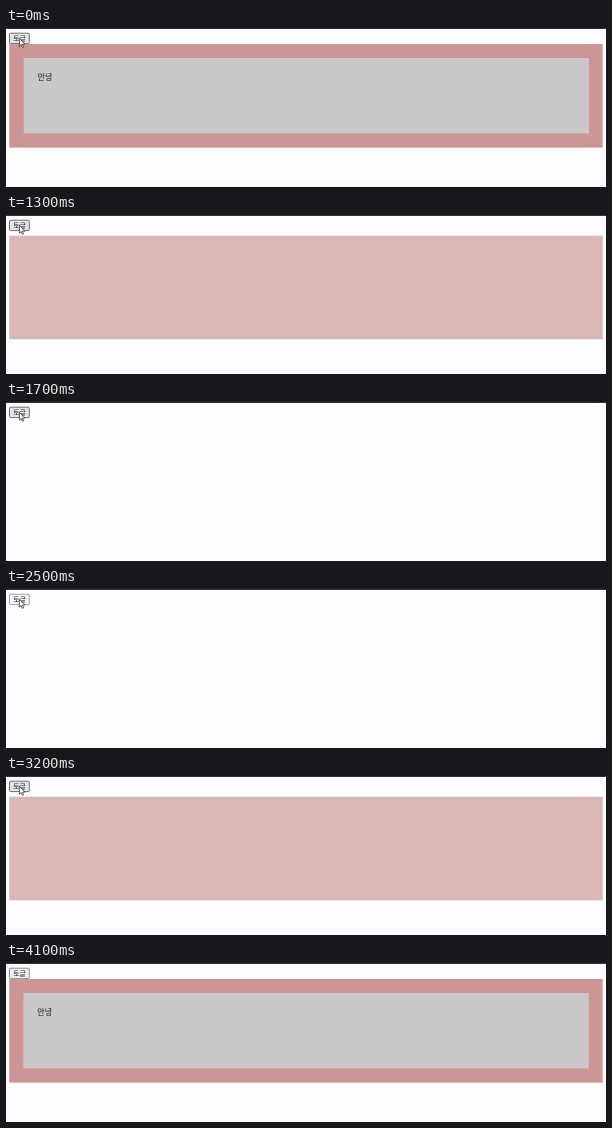
An HTML page for the animation above (4.7 s loop, 600 by 159 pixels).

```html
<!DOCTYPE html>
<html lang="ko">
<head>
<meta charset="utf-8">
<title>Nested transition</title>
<style>
  html, body { margin: 0; width: 100%; height: 100%; overflow: hidden; background: #fdfcfe; }
  svg { display: block; width: 600px; height: 159px; }
  text { font-family: "Noto Sans CJK KR", "Noto Sans CJK", sans-serif; fill: #1c1c1e; }
</style>
</head>
<body>
<svg viewBox="0 0 600 159">
  <rect width="600" height="159" fill="#fdfcfe"/>
  <rect width="600" height="1" fill="#263840"/>
  <g id="button">
    <rect id="face" x="3.5" y="5.2" width="19.8" height="10.4" rx="1" stroke-width=".8"/>
    <text x="13.4" y="12.9" font-size="6.8" text-anchor="middle">토글</text>
  </g>
  <g id="outer">
    <rect x="3.3" y="16" width="593.4" height="103.6" fill="#cb9694"/>
    <g id="inner">
      <rect x="17.4" y="30" width="565.4" height="75.4" fill="#cac8cb"/>
      <text x="31.3" y="52" font-size="8">안녕</text>
    </g>
  </g>
  <path id="cursor" d="M13.4 10.2V18.2L15.2 16.6L16.4 19.4L17.6 18.9L16.4 16.2H18.8Z"
        fill="#fff" stroke="#222" stroke-width=".7" stroke-linejoin="round"/>
</svg>
<script>
const LOOP = 4700, STEP = 100, DURATION = 1000, SHIFT = 14.2;
const [face, outer, inner, cursor] =
  ["face", "outer", "inner", "cursor"].map(id => document.getElementById(id));

// cubic-bezier(.42, 0, .58, 1)
function easeInOut(x) {
  if (x <= 0) return 0;
  if (x >= 1) return 1;
  let lo = 0, hi = 1;
  for (let i = 0; i < 24; i++) {
    const s = (lo + hi) / 2, r = 1 - s;
    const bx = 3 * r * r * s * .42 + 3 * r * s * s * .58 + s * s * s;
    if (bx < x) lo = s; else hi = s;
  }
  return lo * lo * (3 - 2 * lo);
}

const progress = (t, start) => easeInOut((t - start) / DURATION);
const within = (t, from, to) => t >= from && t < to;

function place(node, hidden, dx, dy, visible) {
  node.setAttribute("transform", `translate(${dx * hidden} ${dy * hidden})`);
  node.setAttribute("opacity", visible ? 1 - hidden : 0);
}

function draw(t) {
  const leaving = t < 2600;
  const outerHidden = leaving ? progress(t, 900) : 1 - progress(t, 2600);
  const innerHidden = leaving ? progress(t, -100) : 0;
  place(outer, outerHidden, 0, SHIFT, !within(t, 1700, 2900));
  place(inner, innerHidden, SHIFT, 0, !within(t, 700, 3700));

  const pressed = within(t, 2500, 2700), hover = t < 4100;
  face.setAttribute("fill", pressed ? "#f5f4f6" : hover ? "#e3e2e4" : "#efeef0");
  face.setAttribute("stroke", pressed ? "#8d8d8d" : hover ? "#505050" : "#767676");
  cursor.setAttribute("visibility", hover ? "visible" : "hidden");
}

let begin;
function tick(now) {
  if (begin === undefined) begin = now;
  const t = (now - begin) % LOOP;
  draw(Math.floor(t / STEP) * STEP);
  requestAnimationFrame(tick);
}
draw(0);
requestAnimationFrame(tick);
</script>
</body>
</html>
```
